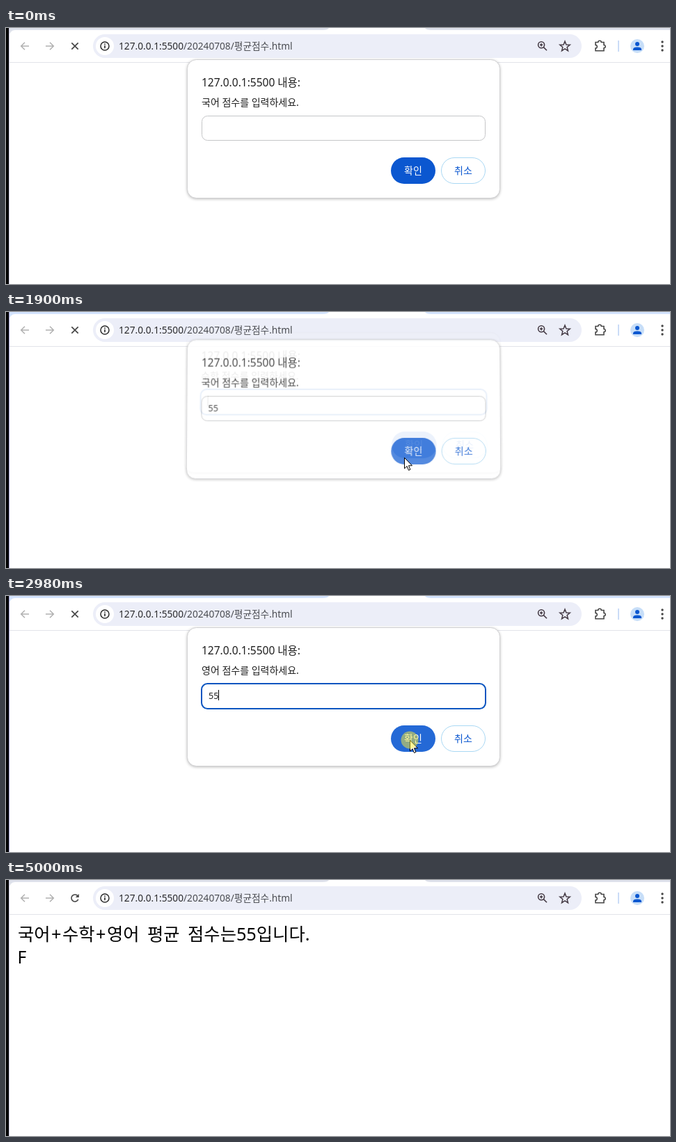
An HTML page with a canvas that plays this animation: 954 px wide and 368 px high, repeating every 5.06 s.

```html
<!DOCTYPE html>
<html lang="ko">
<head>
<meta charset="utf-8">
<title>평균점수</title>
<style>
html, body { margin: 0; width: 954px; height: 368px; overflow: hidden; background: #fff; }
canvas { display: block; }
</style>
</head>
<body>
<canvas id="stage" width="954" height="368"></canvas>
<script>
const W = 954, H = 368, LOOP = 5060, FIRST = 350, TICK = 67.39;
const FADE = 170, FOCUS = 600, LOADED = 3850, IDLE = 5000;
const FONT = '"Noto Sans", "Noto Sans CJK KR", "Noto Sans CJK", sans-serif';
const BLUE = '#0b57d0', DARK = '#474747';

const main = document.getElementById('stage').getContext('2d');
const layerCanvas = document.createElement('canvas');
layerCanvas.width = W;
layerCanvas.height = H;
const layer = layerCanvas.getContext('2d');

const dialogs = [
  { label: '국어', open: -1000, close: 1865, keys: [1420, 1560] },
  { label: '수학', open: 1885, close: 2500, keys: [2230, 2365] },
  { label: '영어', open: 2520, close: 3780, keys: [2700, 2770] }
];

// time, x, y
const path = [
  [340, 720, 360], [600, 467, 145], [1130, 467, 145], [1420, 556, 259],
  [1550, 556, 259], [1690, 572, 209], [2220, 572, 209], [2360, 580, 207],
  [4050, 580, 207], [4255, 558, 226], [4595, 778, 326], [5060, 778, 326]
];

const presses = [[590, 780], [1740, 1895], [2420, 2580], [2900, 3450]];

const clamp = v => Math.max(0, Math.min(1, v));

function text(c, str, x, y, size, color, align = 'left') {
  c.font = size + 'px ' + FONT;
  c.textAlign = align;
  c.fillStyle = color;
  c.fillText(str, x, y);
  return c.measureText(str).width;
}

function box(c, x, y, w, h, r, fill, stroke, width = 1) {
  c.beginPath();
  c.roundRect(x, y, w, h, r);
  if (fill) { c.fillStyle = fill; c.fill(); }
  if (stroke) { c.strokeStyle = stroke; c.lineWidth = width; c.stroke(); }
}

function disc(c, x, y, r, fill) {
  c.beginPath();
  c.arc(x, y, r, 0, Math.PI * 2);
  c.fillStyle = fill;
  c.fill();
}

function line(c, d, color, width) {
  c.strokeStyle = color;
  c.lineWidth = width;
  c.stroke(new Path2D(d));
}

function pointerAt(t) {
  let i = 0;
  while (i < path.length - 2 && t >= path[i + 1][0]) i++;
  const [t0, x0, y0] = path[i], [t1, x1, y1] = path[i + 1];
  const p = clamp((t - t0) / (t1 - t0)), e = p * p * (3 - 2 * p);
  return { x: Math.round(x0 + (x1 - x0) * e), y: Math.round(y0 + (y1 - y0) * e) };
}

function drawReload(c) {
  c.beginPath();
  c.arc(99, 26, 5, 0.35, Math.PI * 2 - 0.75);
  c.strokeStyle = DARK;
  c.lineWidth = 1.6;
  c.stroke();
  c.fillStyle = DARK;
  c.fill(new Path2D('M104.8 20V25H99.8Z'));
}

function drawStar(c, x, y) {
  c.beginPath();
  for (let i = 0; i < 10; i++) {
    const r = i % 2 ? 3.3 : 7.6, a = i * Math.PI / 5 - Math.PI / 2;
    c.lineTo(x + r * Math.cos(a), y + r * Math.sin(a));
  }
  c.closePath();
  c.strokeStyle = '#463c46';
  c.lineWidth = 1.5;
  c.stroke();
}

// The plus signs and spaces are set a little wider than the font has them.
function drawResult(c) {
  let x = 17;
  c.wordSpacing = '4.9px';
  for (const run of '국어+수학+영어 평균 점수는55입니다.'.split(/(\+)/)) {
    const pad = run === '+' ? 1.5 : 0;
    x += text(c, run, x + pad, 87, 25.3, '#000') + 2 * pad;
  }
  c.wordSpacing = '0px';
  text(c, 'F', 16.5, 120, 24.5, '#000');
}

function drawBrowser(c, t) {
  const active = t >= FOCUS && t < IDLE;
  c.fillStyle = '#fff';
  c.fillRect(0, 0, W, H);

  // tab strip and window edge
  c.fillStyle = active ? '#d3e3fd' : '#dee1eb';
  c.fillRect(5, 0, W - 5, 8);
  box(c, 5, 3, W + 10, 30, 8, '#fff');
  c.fill(new Path2D('M455 3Q462 3 464 0H602Q604 3 611 3Z'));
  c.fillStyle = '#000';
  c.fillRect(0, 0, 4, H);
  c.fillStyle = active ? '#9a98c8' : '#c6c5dc';
  c.fillRect(4, 0, 1, H);
  c.fillStyle = '#e2e3e9';
  c.fillRect(5, 49, W, 1);

  // navigation
  line(c, 'M33 26H22M27 20.7L21.7 26L27 31.3', '#b1b1b1', 1.5);
  line(c, 'M57 26H68M63 20.7L68.3 26L63 31.3', '#b1b1b1', 1.5);
  if (t < LOADED) line(c, 'M94.3 21.3L103.7 30.7M103.7 21.3L94.3 30.7', DARK, 1.7);
  else drawReload(c);

  // address bar
  box(c, 125, 9, 702, 34, 17, '#eceef8');
  disc(c, 142, 26, 13, '#fff');
  box(c, 136, 20, 12, 12, 6, null, '#2b2b2b', 1.5);
  c.fillStyle = '#2b2b2b';
  c.fillRect(141.2, 25, 1.6, 4.2);
  c.fillRect(141.2, 22.4, 1.6, 1.6);
  const w = text(c, '127.0.0.1:5500', 162, 31, 13.7, '#2a2a2c');
  text(c, '/20240708/평균점수.html', 162 + w, 31, 13.7, '#4b4d52');
  box(c, 764.6, 19.8, 9, 9, 4.5, null, '#463c46', 1.6);
  line(c, 'M772.4 27.6L777 32.3M769.1 22.2V26.4M767 24.3H771.2', '#463c46', 1.6);
  drawStar(c, 803, 26.6);

  // extension, profile and menu
  line(c, 'M847 20.5H850.7a2.3 2.3 0 0 1 4.6 0H859V24.4a2.2 2.2 0 0 1 0 4.4V32.8H847V29a2.3 2.3 0 0 0 0 -4.6Z',
    DARK, 1.6);
  c.fillStyle = '#cbdcf7';
  c.fillRect(879, 18, 2, 16);
  disc(c, 907, 26, 10, '#c7def8');
  disc(c, 907, 23, 3, BLUE);
  c.fill(new Path2D('M901 32V30.5Q901 27.5 907 27.5T913 30.5V32Z'));
  for (const y of [20, 26, 32]) disc(c, 943, y, 1.7, DARK);

  if (t >= LOADED) drawResult(c);
}

function drawDialog(c, d, t, hover) {
  const focused = t >= FOCUS && t < d.close;
  c.save();
  c.shadowColor = 'rgba(0,0,0,.32)';
  c.shadowBlur = 4;
  c.shadowOffsetY = 1;
  box(c, 260.5, 45.5, 449, 199, 13, '#fff');
  c.restore();
  box(c, 260.5, 45.5, 449, 199, 13, null, '#d2d2d4');

  text(c, '127.0.0.1:5500 내용:', 281, 84, 15.5, '#1f1f1f');
  text(c, d.label + ' 점수를 입력하세요.', 281, 112, 14, '#1f1f1f');

  if (focused) box(c, 281, 126, 408, 36, 8.5, '#fff', '#0b55c0', 2);
  else box(c, 281.5, 126.5, 407, 35, 8, '#fff', '#c5c6c8');

  const typed = d.keys.filter(k => t >= k);
  const w = text(c, '5'.repeat(typed.length), 291, 148, 12.5, '#1f1f1f');
  const last = Math.max(FOCUS, d.open, ...typed);
  if (focused && (t - last) % 1060 < 530) {
    c.fillStyle = '#000';
    c.fillRect(Math.round(291 + w - 0.4), 135, 1, 15);
  }

  box(c, 553, 186, 64, 38, 19, hover ? '#2469d6' : BLUE);
  text(c, '확인', 585, 210, 14, '#fff', 'center');
  box(c, 625.5, 186.5, 63, 37, 18.5, '#fff', '#a9d8f4');
  text(c, '취소', 657, 210, 14, BLUE, 'center');
}

// Lifts and tilts the dialog: rows get wider toward the bottom.
function drawTilted(c, q, alpha) {
  c.save();
  c.globalAlpha = alpha;
  for (let y = 20; y < 254; y++) {
    const row = 45 + (y + 18.3 * q - 45) / (1 + 0.013 * q);
    const s = 1 + 0.018 * q * (row - 45) / 200;
    c.drawImage(layerCanvas, 0, row, W, 1, 485 * (1 - s), y, W * s, 1);
  }
  c.restore();
}

function showDialog(c, d, t, hover) {
  if (t < d.open || t >= d.close + FADE) return;
  const closing = t >= d.close;
  const p = clamp((t - (closing ? d.close : d.open)) / FADE);
  if (!closing && p === 1) return drawDialog(c, d, t, hover);
  layer.clearRect(0, 0, W, H);
  drawDialog(layer, d, t, hover);
  const rest = Math.pow(1 - p, 1.6);
  drawTilted(c, closing ? 1 - rest : rest, closing ? 1 - Math.pow(p, 1.2) : p);
}

function drawPointer(c, t, { x, y }) {
  const inField = t < 1800 && x > 281 && x < 689 && y > 126 && y < 162;
  if (inField) {
    line(c, `M${x - 3} ${y - 8.5}h2.5l1 1l1 -1h2.5M${x + .5} ${y - 8}v16M${x - 3} ${y + 8.5}h2.5l1 -1l1 1h2.5`, '#000', 1);
  } else {
    c.save();
    c.translate(x + 0.5, y + 0.5);
    const arrow = new Path2D('M0 0V15.5L3.6 12.2L6 18L8.4 17L6 11.3H11Z');
    c.fillStyle = '#fff';
    c.fill(arrow);
    c.strokeStyle = '#000';
    c.lineWidth = 1;
    c.stroke(arrow);
    c.restore();
  }
  for (const [from, to] of presses) {
    if (t < from || t >= to) continue;
    const a = 0.5 * clamp(Math.min((t - from) / 100 + 0.3, (to - t) / 150));
    disc(c, x, y, 12.5, `rgba(255,240,50,${a})`);
  }
}

function render(time) {
  const t = time < FIRST ? 0 : FIRST + Math.floor((time - FIRST + 9) / TICK) * TICK;
  const visible = t >= FIRST && t < IDLE - 1;
  const pt = pointerAt(t);
  const hover = visible && pt.x >= 553 && pt.x < 617 && pt.y >= 186 && pt.y < 224;
  drawBrowser(main, t >= IDLE - 1 ? IDLE : t);
  for (const d of dialogs) showDialog(main, d, t, hover);
  if (visible) drawPointer(main, t, pt);
}

const start = performance.now();
function frame() {
  render((performance.now() - start) % LOOP);
  requestAnimationFrame(frame);
}
frame();
</script>
</body>
</html>
```
